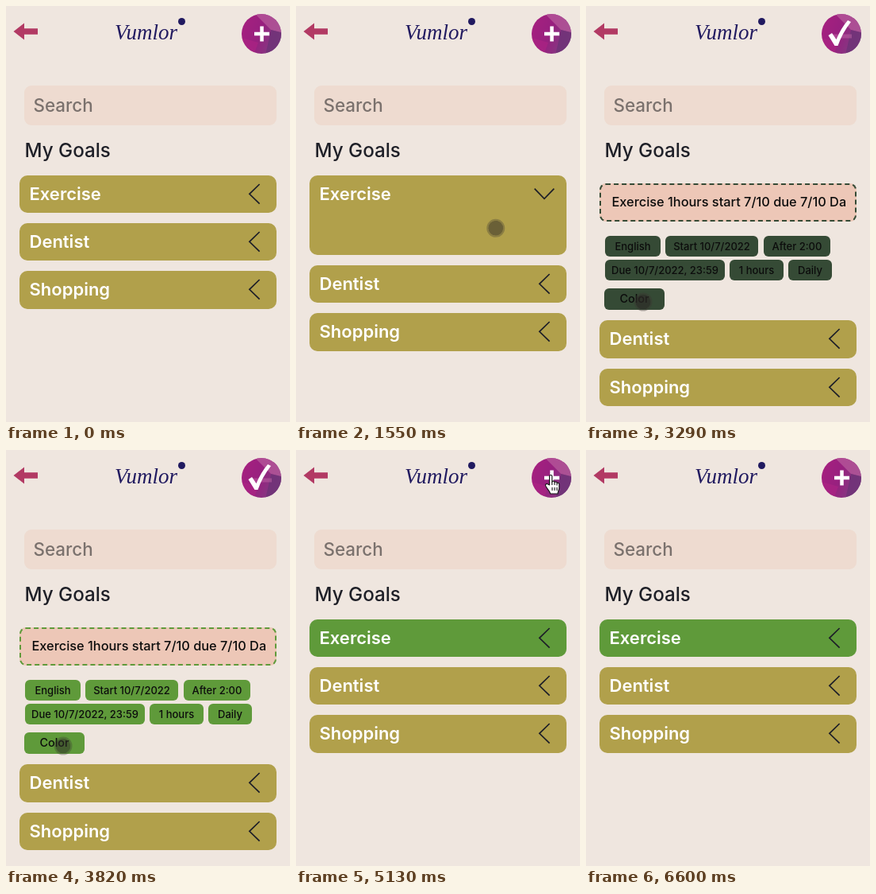
Recreate the animation shown at these times as an HTML page. Size 358 px wide and 523 px high, loop 7060 ms.

```html
<!DOCTYPE html>
<html lang="en">
<head>
<meta charset="utf-8">
<title>My Goals</title>
<style>
  html, body { margin: 0; width: 100%; height: 100%; overflow: hidden; background: #efe6df; }
  svg { display: block; width: 100%; height: 100%; font-family: Inter, "Open Sans", sans-serif; }
  .row text { font-size: 22px; font-weight: 600; fill: #fff; }
  .chev { fill: none; stroke: #1d1e28; stroke-width: 1.7; }
  .chip text { font-size: 13px; font-weight: 500; fill: #0c0c0c; text-anchor: middle; }
  .chip:last-child text { font-size: 14.4px; }
  .brand { font: italic 27px "Liberation Serif", serif; fill: #211a60; }
  #input { box-sizing: border-box; width: 324px; height: 48px; border: 2px dashed; border-radius: 8px; background: #edc7b7; }
</style>
</head>
<body>
<svg viewBox="0 0 358 523">
  <defs>
    <clipPath id="disc"><circle cx="322" cy="35" r="25"/></clipPath>
    <clipPath id="field"><rect x="32" y="226" width="295" height="42"/></clipPath>
    <linearGradient id="plum" x1="0" y1="0" x2="1" y2=".4">
      <stop offset="0" stop-color="#a8207f"/>
      <stop offset=".55" stop-color="#98207f"/>
      <stop offset="1" stop-color="#813d82"/>
    </linearGradient>
  </defs>
  <rect width="358" height="523" fill="#efe6df"/>

  <path d="M9.500 32L23 21.500V28.300H40V35.700H23V42.500Z" fill="#b23a64"/>
  <text class="brand" x="137" y="42">Vumlor</text>
  <circle cx="221.500" cy="19.500" r="4.500" fill="#211a60"/>

  <g clip-path="url(#disc)">
    <rect x="297" y="10" width="50" height="50" fill="url(#plum)"/>
    <path d="M312 8L350 8V34L334 30Z" fill="#b75a9b" opacity=".75"/>
    <path d="M334 30L350 34V62H327Z" fill="#6f3277" opacity=".8"/>
    <path d="M297 40L318 46L312 62H297Z" fill="#b02384" opacity=".6"/>
  </g>
  <path id="plus" d="M313 35H332M322.500 25.500V44.500" stroke="#fff" stroke-width="4.500"/>
  <g id="check">
    <path d="M311 35.500H335V40.500H311Z" fill="#c266a5" opacity=".5"/>
    <path d="M305.500 37L310 34L315.500 42Q322 27 330 18L334 20Q323 34 317.500 50H313.500Z" fill="#fff"/>
  </g>

  <rect x="23" y="100" width="318" height="50" rx="9" fill="#eedbd0"/>
  <text x="34.500" y="133" font-size="22.400" font-weight="500" fill="#7a716d">Search</text>
  <text x="23.500" y="190" font-size="24.200" font-weight="500" fill="#1f2028">My Goals</text>

  <g id="rows"></g>

  <g id="form">
    <foreignObject x="17" y="223" width="324" height="48"><div id="input"></div></foreignObject>
    <g clip-path="url(#field)">
      <text id="entry" y="252" font-size="16.350" font-weight="500" fill="#0c0c0c">Exercise 1hours start 7/10 due 7/10 Daily after 2</text>
    </g>
    <path id="caret" d="M325 237V256" stroke="#111" stroke-width="1.200"/>
    <g id="chips"></g>
  </g>

  <g id="cursor">
    <g id="touch">
      <circle r="9.500" fill="#2d2926"/>
      <circle r="10.500" fill="none" stroke="#3a3532" stroke-width="2" opacity=".6"/>
    </g>
    <path id="arrow" d="M0 0V16.500L3.800 12.900L6.500 19L9 17.900L6.400 12H11.600Z" fill="#fff" stroke="#111"/>
    <g id="hand" fill="#fff" stroke="#111" stroke-width="1.100" stroke-linejoin="round">
      <path d="M-1.500 12V1C-1.500-1 1.800-1 1.800 1V8C2.300 6.500 5 7 5 8.700C5.700 7.400 8 8 8 9.700C9 8.700 10.800 9.500 10.800 11V16C10.800 18 9 20 9 23H-.5C-.5 20-6 15.500-6.500 12.500C-6.500 10.500-4.500 10-3.500 11Z"/>
      <path d="M1.800 8V12M5 9V12M8 10V12.500M2 15V19M5 15V19M8 15V19" fill="none"/>
    </g>
  </g>
</svg>
<script>
const LOOP = 7060;
const OLIVE = "#b1a04b", DARK = "#354a35", MOSS = "#939933", GREEN = "#5f9a3a";
const $ = id => document.getElementById(id);
const set = (el, attrs) => { for (const k in attrs) el.setAttribute(k, attrs[k]); };
const show = (el, on) => { el.style.display = on ? "" : "none"; };
const within = (t, a, b) => t >= a && t < b;

$("rows").innerHTML = ["Exercise", "Dentist", "Shopping"].map(name => `
  <g class="row"><rect x="17" width="324" rx="10"/>
  <text x="29.500" y="31.300">${name}</text>
  <path class="chev" d="M319.600 11L306.900 23.300L319.600 35.600"/></g>`).join("");
const rows = [...document.querySelectorAll(".row")];

const chip = (x, y, w, label, h = 26) => `
  <g class="chip"><rect x="${x}" y="${y}" width="${w}" height="${h}" rx="6"/>
  <text x="${x + w / 2}" y="${y + h / 2 + 4.6}">${label}</text></g>`;
$("chips").innerHTML = [
  [24, 289, 70, "English"], [100, 289, 117, "Start 10/7/2022"], [224, 289, 84, "After 2:00"],
  [24, 319, 151, "Due 10/7/2022, 23:59"], [181, 319, 68, "1 hours"], [255, 319, 55, "Daily"],
  [23, 355, 76, "Color", 27]
].map(c => chip(...c)).join("");
const chipBoxes = [...document.querySelectorAll(".chip rect")];

const out = k => p => 1 - (1 - p) ** k;
const smooth = p => p * p * (3 - 2 * p);

// start, end, steps, from, bend, to, easing
const moves = [
  [530, 950, 7, [330, 434], [326, 335], [312, 243], out(1.6)],
  [1210, 1750, 8, [312, 243], [270, 275], [222, 291], smooth],
  [2610, 3220, 9, [222, 291], [145, 335], [72, 372], smooth],
  [4280, 4980, 11, [72, 372], [222, 231], [321, 32], out(2.5)],
  [5380, 6060, 11, [321, 32], [324, 170], [338, 312], smooth],
  [6330, 6530, 4, [338.5, 313], [325, 410], [289, 516], p => p]
];

function cursorAt(t) {
  const m = moves.filter(m => t >= m[0]).pop() || moves[0];
  const [a, b, n, from, bend, to, ease] = m;
  const step = Math.floor((t - a) / (b - a) * (n - 1) + 0.01) + 1;
  const u = ease(Math.max(0, Math.min(1, step / n))), v = 1 - u;
  return from.map((f, i) => v * v * f + 2 * u * v * bend[i] + u * u * to[i]);
}

const formColor = t => t < 3290 ? OLIVE : t < 3490 ? DARK : t < 3820 ? MOSS : GREEN;

function drawRows(t, editing) {
  const open = within(t, 1210, 2080);
  rows.forEach((row, i) => {
    const shift = editing ? 122.3 : open && i ? 53 : 0;
    const y = 212.8 + 60.2 * i + shift;
    const top = Math.round(y);
    const bottom = Math.round(y + 47.4 + (open && !i ? 53 : 0));
    set(row, { transform: `translate(0 ${top})` });
    set(row.firstElementChild, {
      height: bottom - top,
      fill: !i && t >= 5130 ? GREEN : OLIVE
    });
  });
  set(rows[0].lastElementChild, { transform: `rotate(${open ? -90 : 0} 313 23.3)` });
  show(rows[0], !editing);
}

function drawForm(t, editing) {
  show($("form"), editing);
  show($("check"), editing);
  show($("plus"), !editing);
  const color = formColor(t), focused = t < 3220;
  $("input").style.borderColor = color;
  chipBoxes.forEach(box => set(box, { fill: color }));
  set($("entry"), { x: focused ? 325 : 32.5, "text-anchor": focused ? "end" : "start" });
  show($("caret"), focused);
}

function drawCursor(t) {
  const arrow = within(t, 2150, 2220), hand = within(t, 5130, 5380);
  const pressed = [[950, 1210], [1750, 2080], [3220, 3490], [3690, 3820], [4980, 5130]]
    .some(([a, b]) => within(t, a, b));
  show($("cursor"), within(t, 530, 6600));
  set($("cursor"), { transform: `translate(${cursorAt(t).join(" ")})` });
  show($("arrow"), arrow);
  show($("hand"), hand);
  show($("touch"), !arrow && !hand);
  set($("touch"), { opacity: pressed ? 0.66 : 0.53 });
}

function draw(t) {
  const editing = within(t, 2080, 5130);
  drawRows(t, editing);
  drawForm(t, editing);
  drawCursor(t);
}

const start = performance.now();
function tick() {
  draw((performance.now() - start) % LOOP);
  requestAnimationFrame(tick);
}
tick();
</script>
</body>
</html>
```
